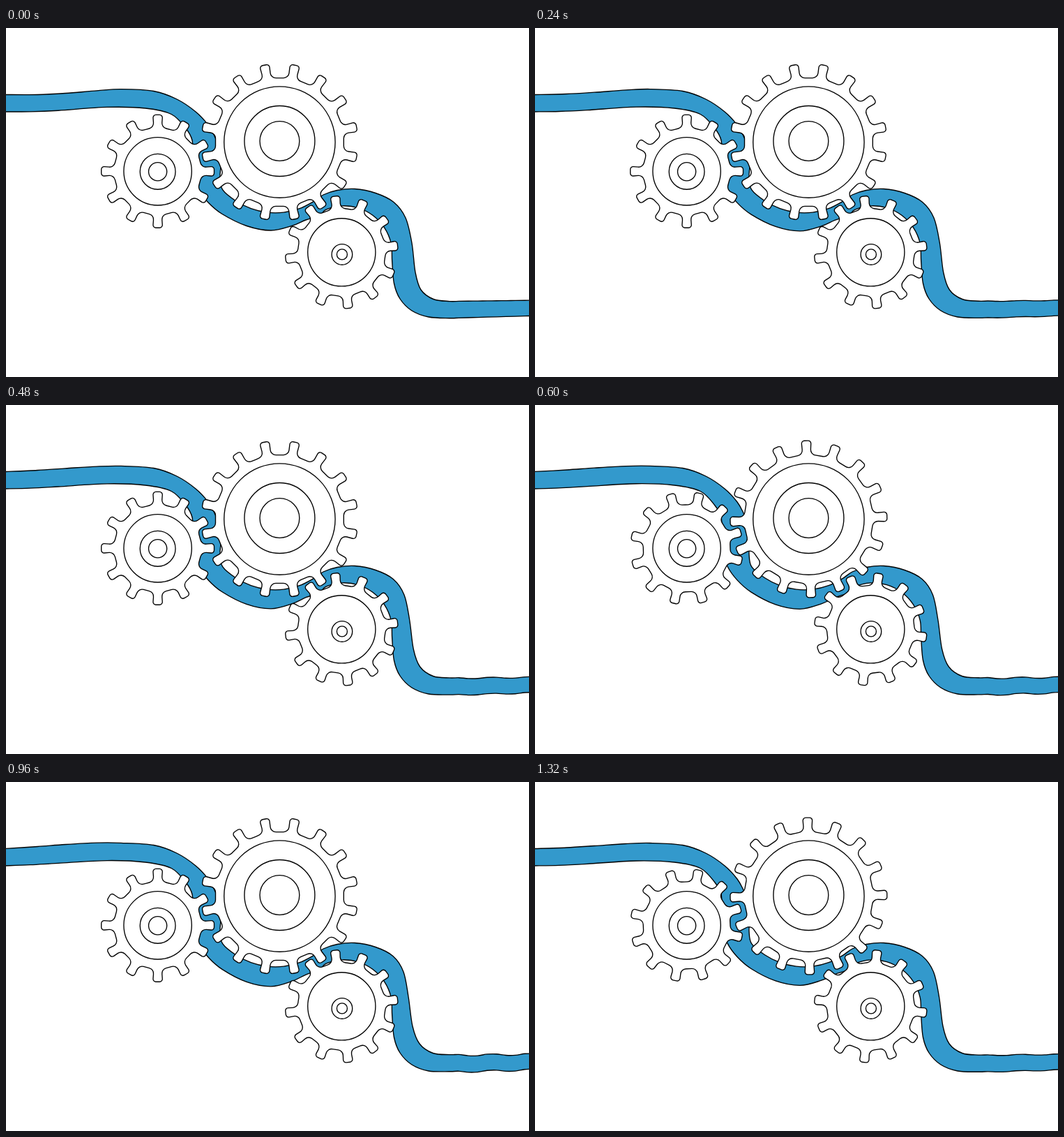
Write an HTML page with a canvas that moves like this. It is 750x500 px and loops after 1440 ms.

```html
<!DOCTYPE html>
<html lang="en">
<head>
<meta charset="utf-8">
<title>Gears and ribbon</title>
<style>
html, body { margin: 0; width: 100%; height: 100%; overflow: hidden; background: #fff; }
canvas { display: block; }
</style>
</head>
<body>
<canvas id="stage" width="750" height="500"></canvas>
<script>
const ctx = document.getElementById('stage').getContext('2d');
const STEP = 120, COUNT = 12, TURN = 2 * Math.PI;

// home: angle in even poses; odd poses add swing, plus drift for each pose
const big = { x: 392.4, y: 163.5, teeth: 16, outer: 112.4, root: 92.6,
  home: -11.2, swing: 11.9, drift: -0.5, hub: [0, -1.5], rings: [50.5, 28.4], rim: 79.7 };
const left = { x: 217.6, y: 205.3, teeth: 12, outer: 80.9, root: 63,
  home: 0, swing: 11, drift: 0.4, hub: [0, 0.5], rings: [25.4, 13.1], rim: 48.7 };
const right = { x: 481.3, y: 321.3, teeth: 12, outer: 80.8, root: 63.3,
  home: -6.7, swing: 11, drift: 0.8, hub: [0.6, 3.1], rings: [14.8, 7.5], rim: 48.6 };

// One half wave between a and b, zero outside
const hump = (v, a, b) => v > a && v < b ? Math.sin(Math.PI * (v - a) / (b - a)) : 0;

// Point around a gear, angle in degrees clockwise from the top
function polar(g, r, deg) {
  const a = deg * TURN / 360;
  return [g.x + r * Math.sin(a), g.y - r * Math.cos(a)];
}

function arc(g, r0, r1, a0, a1, n = 6) {
  return Array.from({ length: n + 1 }, (_, i) =>
    polar(g, r0 + (r1 - r0) * i / n, a0 + (a1 - a0) * i / n));
}

// Rippled run to the right border
function run(x, y, slope, age) {
  const pts = [];
  for (; x < 770; x += 13.5)
    pts.push([x, y + slope * (x - 640) + 1.4 * age * Math.cos(TURN * (x - 670) / 54)]);
  return pts;
}

function upperEdge(age) {
  const lift = 4 * (age - 0.5);
  const start = [[-1, 95.5], [45, 94], [85, 91.5], [130, 88.5], [165, 87.5], [212, 90.5],
    [245, 102], [272, 120], [290, 139], [299, 155], [308, 176], [308, 198], [307, 214]]
    .map(([x, y]) => [x, y - lift * hump(x, 0, 170)]);
  const bend = [[455, 239], [475, 232.5], [500, 230.5], [530, 236.5], [556, 249.5],
    [573, 272], [582, 308], [587, 350], [595, 375], [613, 388.5]]
    .map(([x, y]) => [x - 5 * age * hump(y, 240, 395), y]);
  return [...start, ...arc(big, 106.5, 98, 230, 150), ...bend, ...run(636, 391.5, -0.012, age)];
}

function lowerEdge(age) {
  const lift = 2 * (age - 0.5);
  const start = [[-1, 120], [35, 119.3], [75, 117.3], [145, 113], [200, 115], [237, 123.5],
    [258, 144], [267, 161], [268, 188], [271, 213], [276, 231], [290, 250], [310, 266.5],
    [345, 283.5], [380, 290], [410, 283.5], [430, 275], [449, 269]]
    .map(([x, y]) => [x, y - lift * hump(x, 0, 170) + 3 * age * hump(x, 270, 450)]);
  const bend = [[556.5, 366], [565, 388], [582, 405], [606, 414]];
  return [...start, ...arc(right, 65, 73.5, -20, 100), ...bend, ...run(636, 415.6, -0.028, age)];
}

// Smooth curve through all points
function curve(path, pts, join) {
  if (join) path.lineTo(...pts[0]); else path.moveTo(...pts[0]);
  for (let i = 0; i < pts.length - 1; i++) {
    const p = pts[Math.max(0, i - 1)], a = pts[i], b = pts[i + 1];
    const n = pts[Math.min(pts.length - 1, i + 2)];
    path.bezierCurveTo(a[0] + (b[0] - p[0]) / 6, a[1] + (b[1] - p[1]) / 6,
      b[0] - (n[0] - a[0]) / 6, b[1] - (n[1] - a[1]) / 6, b[0], b[1]);
  }
}

function drawRibbon(age) {
  const top = upperEdge(age), low = lowerEdge(age);
  const body = new Path2D(), edges = new Path2D();
  curve(body, top);
  curve(body, [...low].reverse(), true);
  curve(edges, top);
  curve(edges, low);
  ctx.fillStyle = '#3399cc';
  ctx.fill(body);
  ctx.stroke(edges);
}

function drawRing(x, y, r) {
  ctx.beginPath();
  ctx.arc(x, y, r, 0, TURN);
  ctx.stroke();
}

function drawGear(g, pose) {
  const turn = g.home + (pose % 2) * (g.swing + g.drift * pose);
  // Half a tooth each side: sideways offset, radius, corner rounding
  const corners = [[-5.6, g.root, 8], [-7, g.outer, 4], [7, g.outer, 4], [5.6, g.root, 8]];
  const pts = [];
  for (let i = 0; i < g.teeth; i++) {
    const a = turn * TURN / 360 + i * TURN / g.teeth;
    const c = Math.cos(a), s = Math.sin(a);
    for (const [u, v, r] of corners)
      pts.push([g.x + u * c + v * s, g.y + u * s - v * c, r]);
  }
  const last = pts[pts.length - 1];
  ctx.beginPath();
  ctx.moveTo((last[0] + pts[0][0]) / 2, (last[1] + pts[0][1]) / 2);
  pts.forEach(([x, y, r], i) => {
    const next = pts[(i + 1) % pts.length];
    ctx.arcTo(x, y, next[0], next[1], r);
  });
  ctx.closePath();
  ctx.fillStyle = '#fff';
  ctx.fill();
  ctx.stroke();
  drawRing(g.x, g.y, g.rim);
  for (const r of g.rings) drawRing(g.x + g.hub[0], g.y + g.hub[1], r);
}

function draw(step) {
  // Poses run up to 7, then back down to 3
  const pose = 7 - Math.abs(7 - step);
  ctx.fillStyle = '#fff';
  ctx.fillRect(0, 0, 750, 500);
  ctx.strokeStyle = '#000';
  ctx.lineWidth = 1.35;
  ctx.lineJoin = 'round';
  drawRibbon(Math.min(1, pose / 6));
  for (const g of [big, left, right]) drawGear(g, pose);
}

let shown = 0;
function tick() {
  const step = Math.floor(performance.now() / STEP) % COUNT;
  if (step !== shown) draw(shown = step);
  requestAnimationFrame(tick);
}
draw(0);
requestAnimationFrame(tick);
</script>
</body>
</html>
```
